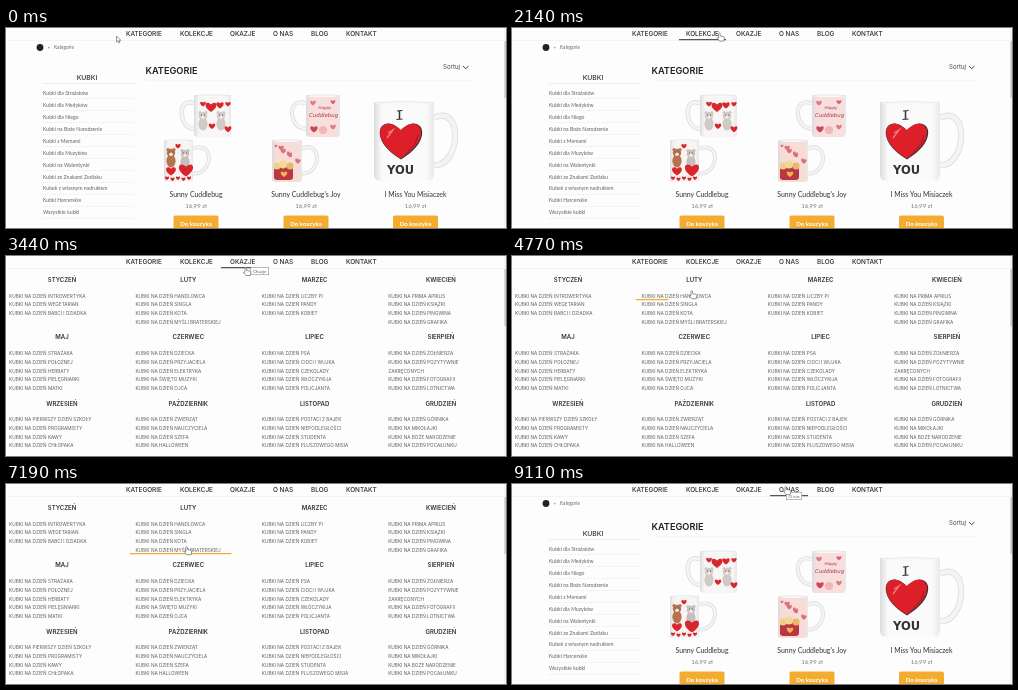
An HTML page with a canvas for the animation above (9210 ms loop, 500 px wide and 200 px high).

```html
<!DOCTYPE html>
<html lang="pl">
<head>
<meta charset="utf-8">
<title>Kubki</title>
<style>
html, body { margin: 0; width: 100%; height: 100%; overflow: hidden; background: #fff; }
canvas { display: block; width: 500px; height: 200px; }
</style>
</head>
<body>
<canvas id="stage" width="500" height="200"></canvas>
<script>
const ctx = document.getElementById('stage').getContext('2d');
const LOOP = 9210;
const CAPS = 'Inter, "Open Sans", sans-serif';
const BODY = 'Lato, "Open Sans", sans-serif';
const PEN = '"DejaVu Sans", sans-serif';
const PAPER = '#fdfdfd';
const ORANGE = '#f3ac30';
const RED = '#d9262c';

const NAV = [['KATEGORIE', 120], ['KOLEKCJE', 174], ['OKAZJE', 224], ['O NAS', 267], ['BLOG', 305], ['KONTAKT', 340]];
const SIDEBAR = ['Kubki dla Strażaków', 'Kubki dla Medyków', 'Kubki dla Niego', 'Kubki na Boże Narodzenie',
  'Kubki z Memami', 'Kubki dla Muzyków', 'Kubki na Walentynki', 'Kubki ze Znakami Zodiaku',
  'Kubek z własnym nadrukiem', 'Kubki Harcerskie', 'Wszystkie kubki'];
const PRODUCTS = [['Sunny Cuddlebug', 190], ["Sunny Cuddlebug's Joy", 300], ['I Miss You Misiaczek', 409.5]];

// Items starting with "=" are not prefixed with "DZIEŃ", "+" continues the line above.
const MONTHS = [
  ['STYCZEŃ', 'INTROWERTYKA', 'WEGETARIAN', 'BABCI I DZIADKA'],
  ['LUTY', 'HANDLOWCA', 'SINGLA', 'KOTA', 'MYŚLI BRATERSKIEJ'],
  ['MARZEC', 'LICZBY PI', 'PANDY', 'KOBIET'],
  ['KWIECIEŃ', '=PRIMA APRILIS', 'KSIĄŻKI', 'PINGWINA', 'GRAFIKA'],
  ['MAJ', 'STRAŻAKA', 'POŁOŻNEJ', 'HERBATY', 'PIELĘGNIARKI', 'MATKI'],
  ['CZERWIEC', 'DZIECKA', 'PRZYJACIELA', 'ELEKTRYKA', '=ŚWIĘTO MUZYKI', 'OJCA'],
  ['LIPIEC', 'PSA', 'CIOCI I WUJKA', 'CZEKOLADY', 'WŁÓCZYKIJA', 'POLICJANTA'],
  ['SIERPIEŃ', 'ŻOŁNIERZA', 'POZYTYWNIE', '+ZAKRĘCONYCH', 'FOTOGRAFII', 'LOTNICTWA'],
  ['WRZESIEŃ', '=PIERWSZY DZIEŃ SZKOŁY', 'PROGRAMISTY', 'KAWY', 'CHŁOPAKA'],
  ['PAŹDZIERNIK', 'ZWIERZĄT', 'NAUCZYCIELA', 'SZEFA', '=HALLOWEEN'],
  ['LISTOPAD', 'POSTACI Z BAJEK', 'NIEPODLEGŁOŚCI', 'STUDENTA', 'PLUSZOWEGO MISIA'],
  ['GRUDZIEŃ', 'GÓRNIKA', '=MIKOŁAJKI', '=BOŻE NARODZENIE', 'POCAŁUNKU']
];
const ROWS = [[24, 40], [81, 97.3], [148, 163.3]];
const ITEM_GAP = 8.8;
const ITEM_SIZE = 4.72;

// time, x, y of the pointer tip
const PATH = [
  [0, 110.5, 8], [100, 110.5, 8], [450, 132, 5], [900, 142, 4], [1180, 178, 3], [1950, 181, 4], [2300, 226, 5],
  [2540, 238, 5], [3040, 240, 10], [3440, 239, 11], [3700, 212, 19], [4040, 181, 31], [4300, 177, 29],
  [5070, 180, 37], [5500, 186, 45], [5970, 176, 56], [6500, 175, 57], [6900, 178, 65], [7250, 180, 62],
  [7800, 215, 28], [8090, 234, 9], [8510, 235, 6], [8640, 238, 5], [8900, 270, 4], [9110, 273, 2], [LOOP, 273, 2]
];
// x range, time range
const NAV_LINES = [[112, 165, 350, 1400], [167, 214, 1400, 2740], [215, 251, 2740, 3640],
  [215, 248, 8040, 8740], [258, 296, 8860, LOOP]];
// item index, time range
const ITEM_LINES = [[0, 4640, 5600], [1, 5580, 6080], [2, 6100, 6560], [3, 6580, 7250], [1, 7300, 7550]];

const clamp = v => Math.max(0, Math.min(1, v));
const ramp = (t, a, b) => clamp((t - a) / (b - a));

function text(str, x, y, size, { color = '#333', weight = 400, align = 'left', font = CAPS } = {}) {
  ctx.font = `${weight} ${size}px ${font}`;
  ctx.textAlign = align;
  ctx.fillStyle = color;
  ctx.fillText(str, x, y + size * 0.36);
}

function rect(x, y, w, h, color, radius = 0) {
  ctx.fillStyle = color;
  ctx.beginPath();
  ctx.roundRect(x, y, w, h, radius);
  ctx.fill();
}

function dot(x, y, r, color, ry = r) {
  ctx.fillStyle = color;
  ctx.beginPath();
  ctx.ellipse(x, y, r, ry, 0, 0, 7);
  ctx.fill();
}

function line(points, color, width = 1) {
  ctx.strokeStyle = color;
  ctx.lineWidth = width;
  ctx.beginPath();
  points.forEach(([x, y]) => ctx.lineTo(x, y));
  ctx.stroke();
}

function heart(x, y, s, color = RED) {
  ctx.fillStyle = color;
  ctx.beginPath();
  ctx.moveTo(x, y + s);
  ctx.bezierCurveTo(x - s * 1.85, y - s * 0.1, x - s, y - s * 1.5, x, y - s * 0.5);
  ctx.bezierCurveTo(x + s, y - s * 1.5, x + s * 1.85, y - s * 0.1, x, y + s);
  ctx.fill();
}

// side: -1 puts the handle on the left, 1 on the right
function mug(x, y, w, h, side, reach, tint) {
  const edge = side < 0 ? x : x + w;
  const handle = (width, color) => {
    ctx.strokeStyle = color;
    ctx.lineWidth = width;
    ctx.beginPath();
    ctx.moveTo(edge, y + h * 0.2);
    ctx.bezierCurveTo(edge + side * reach * 1.25, y + h * 0.02, edge + side * reach * 1.1, y + h * 0.82, edge, y + h * 0.8);
    ctx.stroke();
  };
  handle(w * 0.08 + 1.4, '#dadada');
  handle(w * 0.08, '#f4f4f4');
  const shade = ctx.createLinearGradient(x, 0, x + w, 0);
  shade.addColorStop(0, '#dcdcdc');
  shade.addColorStop(0.13, tint);
  shade.addColorStop(0.88, tint);
  shade.addColorStop(1, '#e8e8e8');
  rect(x, y, w, h, shade, [1, 1, w * 0.1, w * 0.1]);
  dot(x + w / 2, y + 0.8, w / 2, '#e2e2e2', 1.4);
  dot(x + w / 2, y + 1.1, w / 2 - 1, '#fafafa', 0.9);
}

function bear(x, y, color) {
  dot(x, y + 8, 4.6, color, 6.5);
  dot(x, y, 4.2, color);
  dot(x - 3, y - 3.3, 1.6, color);
  dot(x + 3, y - 3.3, 1.6, color);
  dot(x, y + 1.3, 1.8, '#f6e8dd');
  dot(x - 1.5, y - 0.9, 0.5, '#333');
  dot(x + 1.5, y - 0.9, 0.5, '#333');
}

function bearMugs() {
  mug(188, 67, 37, 42, -1, 14, '#f8f6f5');
  bear(197, 88, '#d0cac7');
  bear(215, 88, '#d0cac7');
  heart(205, 79, 5);
  heart(214, 77, 3.4);
  heart(197, 76, 2.6);
  heart(222, 76, 2.4);
  heart(206, 98, 3);
  heart(222, 101, 3.2);
  mug(158, 112, 29, 42, 1, 18, '#f8f4f2');
  bear(165, 125, '#b5744f');
  bear(179, 126, '#c5bfbd');
  heart(180, 142, 6.5);
  heart(165, 143, 4.5);
  heart(172, 118, 2.4);
  for (let i = 0; i < 5; i++) heart(161 + i * 5.5, 150 + (i % 2), 1.9);
}

function pinkMugs() {
  const script = { color: '#a93648', weight: 'italic 500', align: 'center', font: PEN };
  mug(300, 67, 34, 42, -1, 16, '#f8dfdd');
  text('Happy', 319, 80, 4, script);
  text('Cuddlebug', 317.5, 87.5, 5.4, script);
  heart(307, 75, 2.6, '#df7982');
  heart(327, 74, 2.2, '#d9626d');
  heart(308, 101, 3.4, '#cb4655');
  heart(327, 99, 2.6, '#df7982');
  dot(317, 102, 4, '#edb8b7');
  mug(266, 112, 30, 42, 1, 17, '#f8dcd8');
  for (let i = 0; i < 9; i++) heart(270 + (i * 7.3) % 23, 118 + (i * 5.1) % 17, 1.4 + i % 2, '#d9707a');
  rect(268, 139, 19, 13, '#b93742', 3);
  dot(271, 138, 3.5, '#efcf83');
  dot(277, 136.5, 4, '#f2d893');
  dot(284, 138, 3.5, '#e9b86d');
  heart(278, 146, 3, '#f3b34d');
}

function heartMug() {
  mug(368, 74, 60, 79, 1, 24, '#fafafa');
  line([[391, 83], [396.5, 82.5]], '#333', 1.1);
  line([[393.5, 83], [393.5, 91]], '#333', 1.5);
  line([[390.5, 91.5], [396.5, 91]], '#333', 1.1);
  heart(395, 112, 19.5, '#333');
  heart(394.6, 111.6, 18.8, '#dc1f29');
  line([[382, 105], [387, 102], [381, 110]], '#ef7c7e', 1.4);
  line([[399, 127], [409, 116], [412, 107]], '#a31920', 1);
  text('YOU', 394.5, 141.5, 11.5, { color: '#333', weight: 'bold', align: 'center', font: PEN });
}

function drawPage() {
  rect(0, 0, 500, 200, PAPER);
  dot(34, 19.5, 3.4, '#222');
  text('•', 41.5, 19.5, 4.4, { color: '#777' });
  text('Kategorie', 48, 19.7, 4.7, { color: '#666', font: BODY });
  text('KUBKI', 81, 49.3, 6.8, { weight: 500, align: 'center' });
  text('KATEGORIE', 139.5, 43, 9.2, { color: '#1f1f24', weight: 600 });
  text('Sortuj', 437, 39.3, 6.1, { color: '#444' });
  line([[457, 38], [459.7, 40.7], [462.4, 38]], '#444');
  rect(140, 52, 325, 0.6, '#f0f0f0');
  rect(37, 55, 92, 0.6, '#dedede');
  ctx.setLineDash([1, 1]);
  SIDEBAR.forEach((label, i) => {
    const y = 65 + i * 11.95;
    text(label, 37, y, 5.15, { color: '#626262', font: BODY });
    line([[37, Math.round(y + 5) + 0.5], [129, Math.round(y + 5) + 0.5]], '#e4e4e4', 0.7);
  });
  ctx.setLineDash([]);
  bearMugs();
  pinkMugs();
  heartMug();
  PRODUCTS.forEach(([name, x]) => {
    text(name, x, 166.5, 6.9, { align: 'center', font: BODY });
    text('16,99 zł', x, 178, 6.1, { color: '#777', align: 'center', font: BODY });
    rect(x - 22.5, 187.5, 45, 16, ORANGE, 2);
    text('Do koszyka', x, 196, 6.2, { color: '#fff', weight: 700, align: 'center', font: BODY });
  });
}

// A translucent sheet with a soft edge only below it.
function panelBox(bottom, alpha) {
  ctx.globalAlpha = alpha;
  rect(0, 13, 498, bottom - 13, PAPER);
  const edge = ctx.createLinearGradient(0, bottom, 0, bottom + 4);
  edge.addColorStop(0, 'rgba(0,0,0,.3)');
  edge.addColorStop(1, 'rgba(0,0,0,0)');
  rect(0, bottom, 498, 4, edge);
}

function drawSmallPanel(alpha) {
  if (!alpha) return;
  panelBox(50, alpha);
  const heading = { color: '#444', weight: 600, align: 'center' };
  text('ZAWODY', 56, 22, 6, heading);
  text('ZWIERZĘTA', 182.5, 22, 6, heading);
  ctx.globalAlpha = 1;
}

function itemLabel(item) {
  if (item[0] === '+') return item.slice(1);
  return item[0] === '=' ? 'KUBKI NA ' + item.slice(1) : 'KUBKI NA DZIEŃ ' + item;
}

function drawMonths(alpha, t) {
  if (!alpha) return;
  ctx.save();
  ctx.translate(0, 13);
  ctx.scale(1, 0.92 + 0.08 * alpha);
  ctx.translate(0, -13);
  panelBox(202, alpha);
  MONTHS.forEach(([title, ...items], i) => {
    const col = i % 4;
    const [titleY, itemY] = ROWS[Math.floor(i / 4)];
    text(title, 56 + col * 126.3, titleY, 6, { weight: 600, align: 'center' });
    items.forEach((item, k) =>
      text(itemLabel(item), 3 + col * 126.4, itemY + k * ITEM_GAP, ITEM_SIZE, { color: '#5c5c5c' }));
  });
  for (const [k, from, to] of ITEM_LINES) {
    if (t < from || t >= to) continue;
    ctx.font = `400 ${ITEM_SIZE}px ${CAPS}`;
    const full = ctx.measureText(itemLabel(MONTHS[1][k + 1])).width + 16;
    rect(124, Math.round(43.6 + k * ITEM_GAP) - 1, full * ramp(t, from, from + 350), 1.2, ORANGE);
  }
  ctx.restore();
}

function drawNav(t) {
  rect(0, 0, 500, 13, PAPER);
  rect(0, 12.5, 498, 0.6, '#ececec');
  NAV.forEach(([label, x]) => text(label, x, 5.7, 6.4, { color: '#2b2b2b', weight: 500 }));
  for (const [x1, x2, from, to] of NAV_LINES) {
    if (t >= from && t < to) rect(x1, 11, x2 - x1, 1.2, '#555');
  }
  rect(498, 0, 2, 200, '#f3f3f3');
  rect(498.5, 13, 1.5, 57, '#c4c4c4');
}

function tooltip(label, x, y, w) {
  rect(x, y, w, 8, '#8d8d8d');
  rect(x + 0.6, y + 0.6, w - 1.2, 6.8, '#fff');
  text(label, x + w / 2, y + 4, 4.4, { color: '#666', align: 'center', font: BODY });
}

function pointerAt(t) {
  const i = PATH.findIndex(p => p[0] > t);
  const [t1, x1, y1] = PATH[i - 1];
  const [t2, x2, y2] = PATH[i];
  const k = ramp(t, t1, t2);
  const e = k * k * (3 - 2 * k);
  return [x1 + (x2 - x1) * e, y1 + (y2 - y1) * e];
}

const ARROW = new Path2D('M0 0V6L1.4 4.8L2.4 7L3.3 6.5L2.4 4.4H4.4Z');
const HAND = new Path2D('M0 1Q.8 -.5 1.6 1V3.4L5.2 4.2Q6 4.5 5.8 5.6L5.2 8.5H1L-1.4 5.6Q-1.4 4.5 0 5.4Z');

function drawPointer(t) {
  const [x, y] = pointerAt(t);
  const arrow = t < 350 || (t > 3640 && t < 4140) || (t > 7550 && t < 8000);
  const shape = arrow ? ARROW : HAND;
  ctx.save();
  ctx.translate(x, y);
  ctx.fillStyle = '#fff';
  ctx.strokeStyle = '#6a6a6a';
  ctx.lineWidth = 0.7;
  ctx.fill(shape);
  ctx.stroke(shape);
  ctx.restore();
}

function draw(t) {
  drawPage();
  drawSmallPanel(ramp(t, 450, 750) * (1 - ramp(t, 1060, 1320)));
  drawMonths(ramp(t, 2310, 2620) * (1 - ramp(t, 8700, 8980)), t);
  drawNav(t);
  if (t >= 3040 && t < 3540) tooltip('Okazje', 244.5, 11, 18.5);
  if (t >= 9060) tooltip('O nas', 274, 8, 16);
  drawPointer(t);
}

const start = performance.now();
function tick() {
  draw((performance.now() - start) % LOOP);
  requestAnimationFrame(tick);
}
tick();
</script>
</body>
</html>
```
